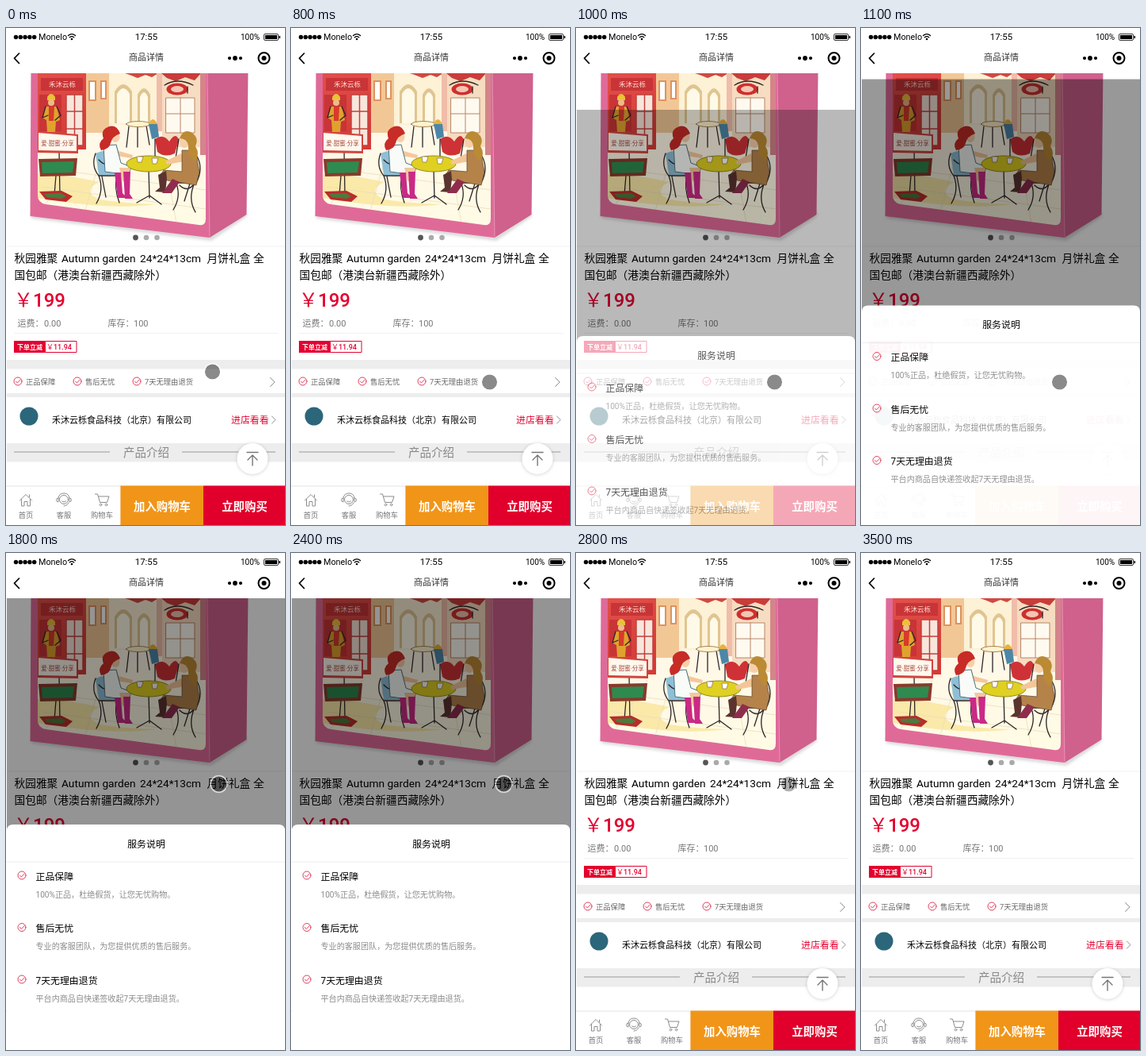
These frames come from a looping animation (352 px wide and 626 px high, 3900 ms). An HTML page:

```html
<!DOCTYPE html>
<html lang="zh-CN">
<head>
<meta charset="utf-8">
<title>商品详情</title>
<style>
  html, body { margin: 0; width: 100%; height: 100%; overflow: hidden; background: #fff; }
  svg { display: block; width: 100vw; height: 100vh; }
  text { font-family: Roboto, "Noto Sans CJK SC", "Noto Sans CJK", sans-serif; white-space: pre; }
  .mid { text-anchor: middle; }
  .bold { font-weight: 700; }
  .med { font-weight: 500; }
  .red { fill: #e4002f; }
  .t9 { font-size: 9.3px; fill: #666; }
  .t11 { font-size: 11px; }
  .t12 { font-size: 11.9px; }
  .name { font-size: 13.7px; }
  .note { font-size: 10.1px; fill: #8a8a8a; }
  .buy { font-size: 14.4px; font-weight: 700; fill: #fff; }
  .line { fill: none; stroke-linecap: round; stroke-linejoin: round; }
  .ink { stroke: #2d2526; stroke-width: 1.3; }
  .gray { stroke: #8c8c8c; stroke-width: 1; }
</style>
</head>
<body>
<svg viewBox="0 0 352 626" preserveAspectRatio="none">
  <defs>
    <g id="check" class="line" stroke="#e2405f" stroke-width="1">
      <circle r="5"/><path d="M-2.5 0L-.6 2L3.2-2"/>
    </g>
    <linearGradient id="scene" x2="0" y2="1">
      <stop stop-color="#f9e6c6"/><stop offset=".4" stop-color="#fff8e8"/><stop offset="1" stop-color="#fffbe4"/>
    </linearGradient>
    <linearGradient id="shop" x2=".3" y2="1">
      <stop stop-color="#e2504a"/><stop offset="1" stop-color="#d63a36"/>
    </linearGradient>
    <filter id="soft" x="-30%" y="-30%" width="160%" height="160%"><feGaussianBlur stdDeviation="2"/></filter>
    <clipPath id="panel"><path d="M40 50H252V240Q252 250 243 248L50 222Q40 220 40 210Z"/></clipPath>
    <clipPath id="below"><path d="M0 57H352V626H0Z"/></clipPath>
  </defs>
  <path fill="#fff" d="M0 0H352V626H0Z"/>

  <!-- gift box -->
  <path fill="#777" opacity=".4" filter="url(#soft)" d="M32 235L258 263L303 232V237L259 267L32 239Z"/>
  <path fill="#cf618c" d="M253 50H305.500L303.500 235L257 264Z"/>
  <path fill="#df6a98" d="M31.500 50H254L257 264L30.500 237Z"/>
  <path class="line" stroke="#e58fb2" d="M254 57L257 263"/>
  <g clip-path="url(#panel)">
    <path fill="url(#scene)" d="M40 50H253V252H40Z"/>
    <path fill="#f6dc78" opacity=".55" d="M40 184Q70 183 118 194Q94 205 118 216Q150 221 190 222Q130 230 40 214Z"/>
    <g class="line" stroke="#eaddbb" stroke-width=".8">
      <path d="M90 160L50 222M120 160L100 230M205 190L215 246M60 178L252 204M45 200L252 228"/>
    </g>
    <!-- street -->
    <path fill="#f2c796" d="M100 57H130V132H100Z"/>
    <path fill="#fdf1d6" d="M130 57H195V122H130Z"/>
    <path fill="#de925f" d="M104 66H114V92H104ZM119 66H127V90H119Z"/>
    <path fill="#fff" d="M106 68H112V90H106ZM121 68H125V88H121Z"/>
    <path fill="#e0c591" d="M137 120V80Q148 62 159 80V120ZM166 120V84Q174 68 182 84V120Z"/>
    <path fill="#fff9e8" d="M140 120V83Q148 69 156 83V120ZM169 120V87Q174 75 179 87V120Z"/>
    <path fill="#cf4a42" d="M150 57H192L184 62L176 59L166 63L156 59Z"/>
    <path fill="#f0bda9" d="M190 57H197V130H190Z"/>
    <path fill="#f6dcc0" d="M197 57H253V150H197Z"/>
    <path fill="#fffaf0" d="M202 88H238V132H202Z"/>
    <path class="line" stroke="#b98468" d="M202 88H238V132H202ZM220 88V132M202 108H238"/>
    <path fill="#c93c3a" d="M196 57H246L238 66L226 62L214 67L203 63Z"/>
    <ellipse cx="216" cy="77" rx="13.500" ry="7.500" fill="#cf2f2e"/>
    <ellipse cx="216" cy="77" rx="8" ry="4" fill="#f3c5b3"/>
    <path class="line ink" d="M200 72Q216 62 236 72M229 74V82"/>
    <path fill="#d5848a" d="M245 57H253V160H245Z"/>
    <!-- shop front -->
    <path fill="url(#shop)" d="M40 57H101V153H40Z"/>
    <path fill="#c83437" d="M44 63H97V79H44ZM42 84H70V130H42Z"/>
    <text class="mid" x="71" y="74" font-size="8.500" fill="#ffe3d2">禾沐云栎</text>
    <path fill="#f8e6dc" d="M76 84H97V148H76Z"/>
    <path class="line" stroke="#c2403c" stroke-width="1.500" d="M76 84H97V148H76ZM86.500 84V148M76 105H97M76 127H97"/>
    <!-- doorman -->
    <path fill="#eac236" d="M52 87Q57 79 62 87V91H52Z"/>
    <circle cx="57" cy="94" r="4" fill="#edbb87"/>
    <path fill="#dfa32d" d="M50 99H64L68 116L63 118L62 131H52L51 116L46 113Z"/>
    <path fill="#d93a2c" d="M54 99H61L60 117H54Z"/>
    <path class="line ink" stroke-width=".8" d="M50 99L46 113L53 110M64 99L69 110L62 116"/>
    <!-- sign boards -->
    <path class="line ink" d="M67 154L68 211M63 186L61 210"/>
    <path fill="#d2453f" d="M39 130L91 134V158L39 157Z"/>
    <path fill="#fff8ed" d="M41 132L89 136V155L41 154Z"/>
    <text class="mid" x="65" y="148" font-size="7.500" fill="#a2443d">爱·甜蜜·分享</text>
    <path fill="#893a2c" d="M41 165L90 164L88 186L43 187Z"/>
    <path fill="#2f8a4f" d="M45 169L86 168L84 182L46 183Z"/>
    <path fill="#b92c2c" d="M42 206L70 205L84 212L76 219L50 216Z"/>
    <path fill="#4d7a3c" d="M48 209L69 208L76 212L70 215L52 213Z"/>
    <!-- far table and chairs -->
    <path fill="#cf3236" d="M188 140Q198 132 206 143Q214 130 218 141L213 158Q200 164 191 156Z"/>
    <path class="line ink" d="M152 121Q168 117 181 123M166 122V150M155 124L152 150M177 123L181 147M188 140V172M218 140L214 164"/>
    <ellipse cx="167" cy="121" rx="15" ry="3.500" fill="#fff4cf" stroke="#a68455"/>
    <path fill="#4c87a8" d="M180 121H191L193 137L184 140Z"/>
    <path fill="#e5b23c" d="M180 121Q185 109 191 121Z"/>
    <!-- left chair and guest -->
    <path fill="#8fbfd6" d="M113 158Q128 150 142 160L140 185H117Z"/>
    <path class="line ink" d="M113 158Q107 174 117 186H144M117 186Q124 204 114 221M140 186Q136 202 143 220M121 187L126 213M117 166Q128 178 139 165"/>
    <path fill="#f4c79d" d="M139 145L142 155L160 160L159 164L139 161Z"/>
    <path fill="#f8fbf7" stroke="#4b7482" d="M123 148L139 147L145 170L158 175L155 185L125 181Z"/>
    <path fill="#f4c79d" d="M143 176L157 176L154 193H147L145 184Z"/>
    <path fill="#c92a86" d="M137 182H145L147 208L153 214H141ZM148 181H157L156 209L160 215H150Z"/>
    <ellipse cx="138" cy="137" rx="5.500" ry="7" fill="#f6cfaa"/>
    <path fill="#c72c27" d="M144 133Q139 120 128 125Q119 129 123 139Q115 145 120 154Q130 153 132 145Q134 136 144 133Z"/>
    <!-- table -->
    <path class="line ink" stroke-width="2" d="M180 178L181 214M181 211L165 220M181 211L196 222"/>
    <ellipse cx="180" cy="171" rx="28" ry="10" fill="#dfd022" stroke="#92891d"/>
    <path fill="#fff" stroke="#8a6a42" stroke-width=".7" d="M165 162H173L171 169H166ZM184 164H192L190 171H185Z"/>
    <!-- right guest and chair -->
    <path class="line ink" d="M240 160Q250 176 240 195H213M238 195Q229 215 239 232M215 196Q221 213 211 229M232 196L225 218M219 198Q228 207 236 198"/>
    <path fill="#f3c699" d="M221 158L201 168L203 172L225 168Z"/>
    <path fill="#b5834a" stroke="#59402c" stroke-width=".7" d="M222 154L239 154L244 181L240 198L204 192L193 188L199 179L222 181Z"/>
    <path fill="#5b3430" d="M202 180L192 185L194 201L188 206L201 207L203 190Z"/>
    <path fill="#8f2d4e" d="M210 190L202 201L197 208H209L219 194Z"/>
    <ellipse cx="225" cy="144" rx="5.500" ry="7" fill="#f6cfaa"/>
    <path fill="#bb8a34" d="M219 139Q224 126 235 132Q244 139 239 149Q245 158 239 168Q229 162 230 149Q229 139 219 139Z"/>
  </g>
  <g fill="#aaa"><circle cx="163.500" cy="264" r="3.400" fill="#555"/><circle cx="177" cy="264" r="3.300"/><circle cx="190.500" cy="264" r="3.300"/></g>

  <!-- product text -->
  <path fill="#f1f1f1" d="M1 274.500H352V275.500H1ZM10 384H344V385H10Z"/>
  <g class="name">
    <text x="10.500" y="295">秋园雅聚</text><text x="70" y="295">Autumn garden</text>
    <text x="169" y="295">24*24*13cm</text><text x="253.500" y="295">月饼礼盒</text><text x="312" y="295">全</text>
    <text x="10.500" y="315.500">国包邮（港澳台新疆西藏除外）</text>
  </g>
  <text class="red med" x="10" y="350.500" font-size="24">￥199</text>
  <g class="t11" fill="#777">
    <text x="14.500" y="376">运费：</text><text x="48" y="376">0.00</text>
    <text x="128.500" y="376">库存：</text><text x="161" y="376">100</text>
  </g>
  <path class="red" d="M10 394H49.500V409H10Z"/>
  <path fill="#fff" stroke="#e4002f" d="M49.500 394.500H89V408.500H49.500Z"/>
  <text class="bold" x="14" y="404.700" font-size="8" fill="#fff">下单立减</text>
  <text class="red med" x="51" y="405" font-size="9">￥11.94</text>

  <!-- guarantees and shop -->
  <path fill="#ededed" d="M1 418H352V429.500H1ZM1 460H352V465H1ZM1 523H352V546.500H1Z"/>
  <use href="#check" x="15" y="445"/><use href="#check" x="90" y="445"/><use href="#check" x="165" y="445"/>
  <g class="t9"><text x="25" y="448.500">正品保障</text><text x="100" y="448.500">售后无忧</text><text x="175" y="448.500">7天无理由退货</text></g>
  <path class="line gray" d="M333.500 440.500L339 446L333.500 451.500M335.500 489L340 493.500L335.500 498"/>
  <circle cx="29" cy="489" r="11.500" fill="#2c667a"/>
  <text class="t11" x="58" y="498">禾沐云栎食品科技（北京）有限公司</text>
  <text class="t12 red" x="284" y="498">进店看看</text>
  <path fill="#999" d="M10 533.500H131V534.500H10ZM222 533.500H340V534.500H222Z"/>
  <text class="mid" x="177" y="540" font-size="14.500" fill="#888">产品介绍</text>
  <circle cx="311" cy="543" r="19.500" fill="#777" opacity=".35" filter="url(#soft)"/>
  <circle cx="311" cy="542.500" r="19.500" fill="#fff"/>
  <path class="line" stroke="#777" stroke-width="1.400" d="M304 534.500H318M311 551V538M305 544L311 538L317 544"/>

  <!-- bottom bar -->
  <path fill="#fff" d="M0 577H352V626H0Z"/><path fill="#e4e4e4" d="M0 576.500H352V577.500H0Z"/>
  <g class="line gray">
    <path d="M17.500 595L25 587.500L32.500 595M19.500 593.500V602H23V596.500H27V602H30.500V593.500M29.500 591V588"/>
    <circle cx="73" cy="594" r="5.500"/>
    <path d="M66 596V592Q67 586 73 586T80 592V596M66 592Q63.500 592 63.500 594.500T66 597M80 592Q82.500 592 82.500 594.500T80 597M70.500 596Q73 598.500 75.500 596M79 598Q77 602 73 602"/>
    <path d="M112.500 587H115.500L118.500 597.500H127.500L130 590H116.500"/>
    <circle cx="119.500" cy="600.500" r="1.300"/><circle cx="126.500" cy="600.500" r="1.300"/>
  </g>
  <g class="t9 mid" style="fill:#777"><text x="25" y="617">首页</text><text x="73" y="617">客服</text><text x="121" y="617">购物车</text></g>
  <path fill="#f19518" d="M144.400 576.500H249V626H144.400Z"/><path fill="#e1002b" d="M249 576.500H352V626H249Z"/>
  <text class="buy mid" x="197" y="608">加入购物车</text><text class="buy mid" x="301" y="608">立即购买</text>

  <!-- service sheet -->
  <g clip-path="url(#below)"><g id="sheet">
    <path opacity=".42" d="M1 57H352V360H1Z"/>
    <path fill="#fff" d="M1 626V350Q1 342 9 342H344Q352 342 352 350V626Z"/>
    <path fill="#eee" d="M1 388.500H352V389.500H1Z"/>
    <text class="t12 med mid" x="177" y="370.500">服务说明</text>
    <g id="items"></g>
  </g></g>

  <!-- header -->
  <path fill="#fff" d="M0 0H352V57H0Z"/>
  <g><circle cx="12.500" cy="11.500" r="2.700"/><circle cx="18.300" cy="11.500" r="2.700"/><circle cx="24.100" cy="11.500" r="2.700"/><circle cx="29.900" cy="11.500" r="2.700"/><circle cx="35.700" cy="11.500" r="2.700"/></g>
  <text x="41" y="15" font-size="10.800">Monelo</text>
  <path class="line" stroke="#000" stroke-width="1.400" d="M78.500 9.500Q83 5.800 87.500 9.500M80.300 11.700Q83 9.500 85.700 11.700"/><circle cx="83" cy="14" r="1.300"/>
  <text class="mid" x="177" y="14.800" font-size="11.400">17:55</text>
  <text x="296" y="14.500" font-size="10">100%</text>
  <rect x="325.500" y="7.500" width="18" height="8" rx="1.500" fill="none" stroke="#000" stroke-width=".8"/>
  <path d="M327 9H342V14H327ZM344.500 10H346V13H344.500Z"/>
  <path class="line" stroke="#000" stroke-width="1.700" d="M16.500 32L10.500 38.200L16.500 44.500"/>
  <text class="t11 mid" x="177" y="41" fill="#333">商品详情</text>
  <circle cx="282" cy="38" r="2.100"/><circle cx="289" cy="38" r="2.900"/><circle cx="296" cy="38" r="2.100"/>
  <circle cx="325.500" cy="38" r="7" fill="none" stroke="#000" stroke-width="2"/><circle cx="325.500" cy="38" r="3"/>

  <g id="touch"><circle r="9.600" opacity=".46"/><circle r="10.400" fill="none" stroke="#fff" stroke-width="1.500" opacity=".65"/></g>
</svg>
<script>
  const LOOP = 3900, STEP = 100;
  const $ = id => document.getElementById(id);

  const services = [
    ['正品保障', '100%正品，杜绝假货，让您无忧购物。'],
    ['售后无忧', '专业的客服团队，为您提供优质的售后服务。'],
    ['7天无理由退货', '平台内商品自快递签收起7天无理由退货。']
  ];
  $('items').innerHTML = services.map(([head, note], i) => {
    const y = 407 + i * 65.5;
    return `<use href="#check" x="20" y="${y - 1}"/>
      <text class="t12" x="37.5" y="${y + 4.7}">${head}</text>
      <text class="note" x="37.5" y="${y + 26.7}">${note}</text>`;
  }).join('');

  // time, offset, opacity
  const sheetKeys = [
    [0, 569, 0], [800, 569, 0], [900, 190, .3], [1000, 46, .66], [1100, 7.5, .96], [1200, 1, .99],
    [1300, 0, 1], [2500, 0, 1], [2600, 174, 1], [2700, 400, 1], [2800, 569, 1]
  ];
  // time, x, y, opacity
  const touchKeys = [
    [0, 260.5, 433, 1], [300, 251, 445, 1], [400, 250.5, 446, 1], [1300, 250.5, 446, 1],
    [1400, 252, 435, 1], [1500, 257, 390, 1], [1600, 263, 335, 1], [1700, 267, 300, 1],
    [1800, 268.5, 291, 1], [2700, 268.5, 291, 1], [3000, 268.5, 291, 0]
  ];

  function at(keys, t) {
    const i = keys.findIndex(k => k[0] > t);
    if (i < 0) return keys[keys.length - 1].slice(1);
    const a = keys[i - 1], b = keys[i], p = (t - a[0]) / (b[0] - a[0]);
    return a.slice(1).map((v, n) => v + (b[n + 1] - v) * p);
  }

  function place(el, x, y, opacity) {
    el.setAttribute('transform', `translate(${x} ${y})`);
    el.setAttribute('opacity', opacity);
  }

  const start = performance.now();
  function draw() {
    const t = Math.floor((performance.now() - start) % LOOP / STEP) * STEP;
    place($('sheet'), 0, ...at(sheetKeys, t));
    place($('touch'), ...at(touchKeys, t));
    requestAnimationFrame(draw);
  }
  draw();
</script>
</body>
</html>
```
